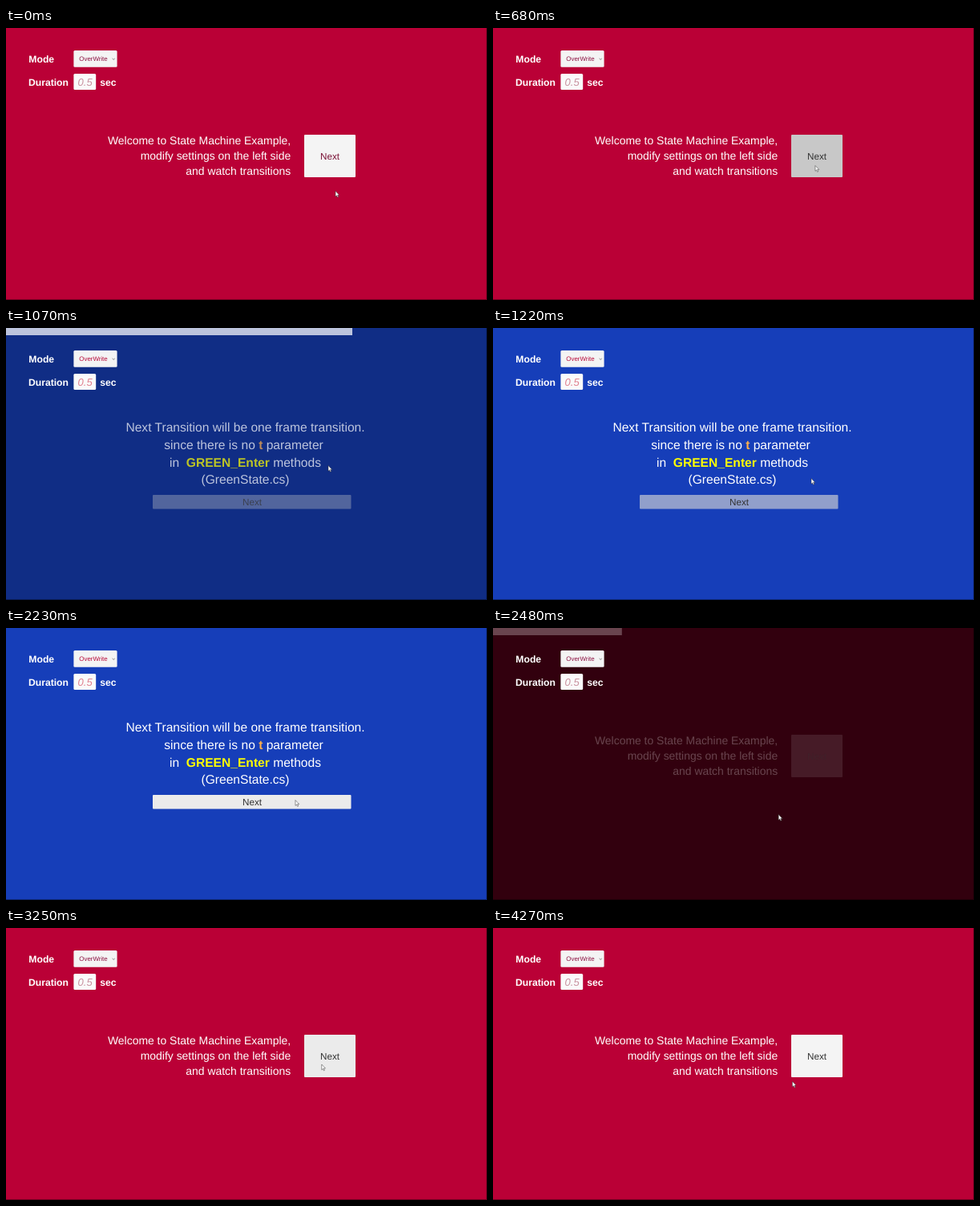
An HTML page that plays this animation: 600 by 339 pixels, repeating every 4310 ms.

```html
<!DOCTYPE html>
<html lang="en">
<head>
<meta charset="utf-8">
<title>State transitions</title>
<style>
  html, body { margin: 0; width: 100%; height: 100%; overflow: hidden; background: #000; }
  svg { display: block; width: 100vw; height: 100vh; --mode: #8c1040; --secs: #c9919f; }
  svg.blue { --mode: #b80a3a; --secs: #e0808f; }
  text {
    font-family: "Liberation Sans", Arial, sans-serif;
    white-space: pre; text-rendering: geometricPrecision;
  }
  .head text { font-size: 12.2px; font-weight: bold; fill: #fff; }
  .head .mode { font-size: 7.9px; font-weight: normal; fill: var(--mode); }
  .head .secs { font-size: 13px; font-weight: normal; font-style: italic; fill: var(--secs); }
  .panel { fill: #fff; }
  .panel .next { font-size: 11.7px; text-anchor: middle; fill: #323232; }
  .panel .tinted { fill: #7a1236; }
  #red { font-size: 13.95px; text-anchor: end; }
  #blue { font-size: 15.6px; text-anchor: middle; }
  .strong { font-weight: bold; }
</style>
</head>
<body>
<svg viewBox="0 0 600 339" preserveAspectRatio="none">
  <rect id="back" width="600" height="339"/>
  <rect id="bar" height="9" fill="#fff"/>

  <g class="head">
    <text x="28.3" y="43.3">Mode</text>
    <rect x="84.4" y="28" width="54.2" height="20.8" rx="1.5" fill="#f4f4f4"/>
    <text class="mode" x="91.3" y="41.2">OverWrite</text>
    <path d="M132.6 38l1.6 1.4 1.6-1.4" fill="none" stroke="#666" stroke-width=".8"/>
    <text x="27.9" y="71.6">Duration</text>
    <rect x="84.4" y="57.1" width="27.8" height="20" rx="1.5" fill="#fafafa"/>
    <text class="secs" x="89.6" y="72">0.5</text>
    <text x="117.3" y="71.6">sec</text>
  </g>

  <g id="red" class="panel">
    <text x="355.2" y="145.2">Welcome to State Machine Example,</text>
    <text x="355.2" y="164.2">modify settings on the left side</text>
    <text x="355.2" y="183.1">and watch transitions</text>
    <rect class="button" x="372" y="133" width="64" height="53" rx="1"/>
    <text class="next" x="404" y="163.8">Next</text>
  </g>

  <g id="blue" class="panel">
    <text x="298.5" y="129.2">Next Transition will be one frame transition.</text>
    <text x="296.5" y="150.9">since there is no <tspan class="strong" fill="#ffb04a">t</tspan> parameter</text>
    <text x="298.5" y="172.6">in  <tspan class="strong" fill="#ff0">GREEN_Enter</tspan> methods</text>
    <text x="298.5" y="194.3">(GreenState.cs)</text>
    <rect class="button" x="183" y="208" width="247.5" height="17.6" rx="1"/>
    <text class="next" x="307" y="221.2">Next</text>
  </g>

  <path d="M599.5 0V338.5H0" fill="none" stroke="#000" stroke-opacity=".4"/>
  <path id="pointer" d="M0 0V6.8L1.5 5.4 2.6 7.8 3.7 7.3 2.6 4.9H4.7Z" fill="#fff" stroke="#333" stroke-width=".5"/>
</svg>

<script>
const LOOP = 4310, FADE = 500, TICK = 77, PRESS = 90;
const TO_BLUE = 700, TO_RED = 2312;

// Stops of the pointer tip
const STOPS = [
  { t: 150, x: 411, y: 203.3 },
  { t: 440, x: 402, y: 171.5 },
  { t: 1070, x: 402, y: 171.5 },
  { t: 1214, x: 397, y: 187.5 },
  { t: 1500, x: 361, y: 214.5 },
  { t: 2214, x: 361, y: 214.5 },
  { t: 2600, x: 353, y: 244.5 },
  { t: 3220, x: 394, y: 169.5 },
  { t: 3900, x: 394, y: 169.5 },
  { t: 4080, x: 358, y: 189 },
  { t: 4240, x: 376, y: 191.5 }
];

const find = s => document.querySelector(s);
const stage = find("svg"), back = find("#back"), bar = find("#bar");
const pointer = find("#pointer"), redNext = find("#red .next");

const RED = { panel: find("#red"), rgb: [186, 0, 54], leaves: TO_BLUE };
const BLUE = { panel: find("#blue"), rgb: [22, 62, 185], leaves: TO_RED };
for (const state of [RED, BLUE]) {
  state.button = state.panel.querySelector(".button");
  state.box = state.button.getBBox();
}

const clamp = v => Math.min(1, Math.max(0, v));
const mix = (a, b, k) => a + (b - a) * k;
const rgb = parts => `rgb(${parts.map(Math.round)})`;
const set = (el, attrs) => {
  for (const key in attrs) el.setAttribute(key, attrs[key]);
};

// The screen is refreshed once per tick
const refresh = t => Math.max(0, Math.floor((t + 18) / TICK) * TICK - 18);

function pointerAt(t) {
  const next = STOPS.findIndex(stop => stop.t > t);
  if (next < 0) return STOPS[STOPS.length - 1];
  const b = STOPS[next], a = STOPS[next - 1] || b;
  const k = a === b ? 0 : (t - a.t) / (b.t - a.t);
  return { x: mix(a.x, b.x, k), y: mix(a.y, b.y, k) };
}

// Disabled and fading in, then blending to its enabled look
function buttonLook(t, state, age, tip) {
  if (age < FADE) return [200, age / FADE / 2];
  const dx = tip.x - state.box.x, dy = tip.y - state.box.y;
  const over = dx > 0 && dx < state.box.width && dy > 0 && dy < state.box.height;
  const pressed = t < state.leaves && t > state.leaves - PRESS;
  const rest = pressed ? 200 : over ? 235 : 244;
  const enabled = clamp((age - FADE + 15) / 100);
  return [mix(200, rest, enabled), mix(.5, 1, enabled)];
}

function draw(t) {
  const inBlue = t >= TO_BLUE && t < TO_RED;
  const state = inBlue ? BLUE : RED;
  const age = inBlue ? t - TO_BLUE : (t - TO_RED + LOOP) % LOOP;
  const k = clamp(age / FADE);
  const tip = pointerAt(t);
  const [grey, alpha] = buttonLook(t, state, age, tip);

  stage.classList.toggle("blue", inBlue);
  redNext.classList.toggle("tinted", t < 300);
  RED.panel.style.display = inBlue ? "none" : "";
  BLUE.panel.style.display = inBlue ? "" : "none";
  set(back, { fill: rgb(state.rgb.map(c => c * k)) });
  set(bar, { width: k < 1 ? 600 * k : 0, "fill-opacity": k });
  set(state.panel, { "fill-opacity": k });
  set(state.button, { fill: rgb([grey, grey, grey]), "fill-opacity": alpha });
  set(pointer, { transform: `translate(${tip.x} ${tip.y})` });
}

const start = performance.now();
function tick() {
  draw(refresh((performance.now() - start) % LOOP));
  requestAnimationFrame(tick);
}
tick();
</script>
</body>
</html>
```
